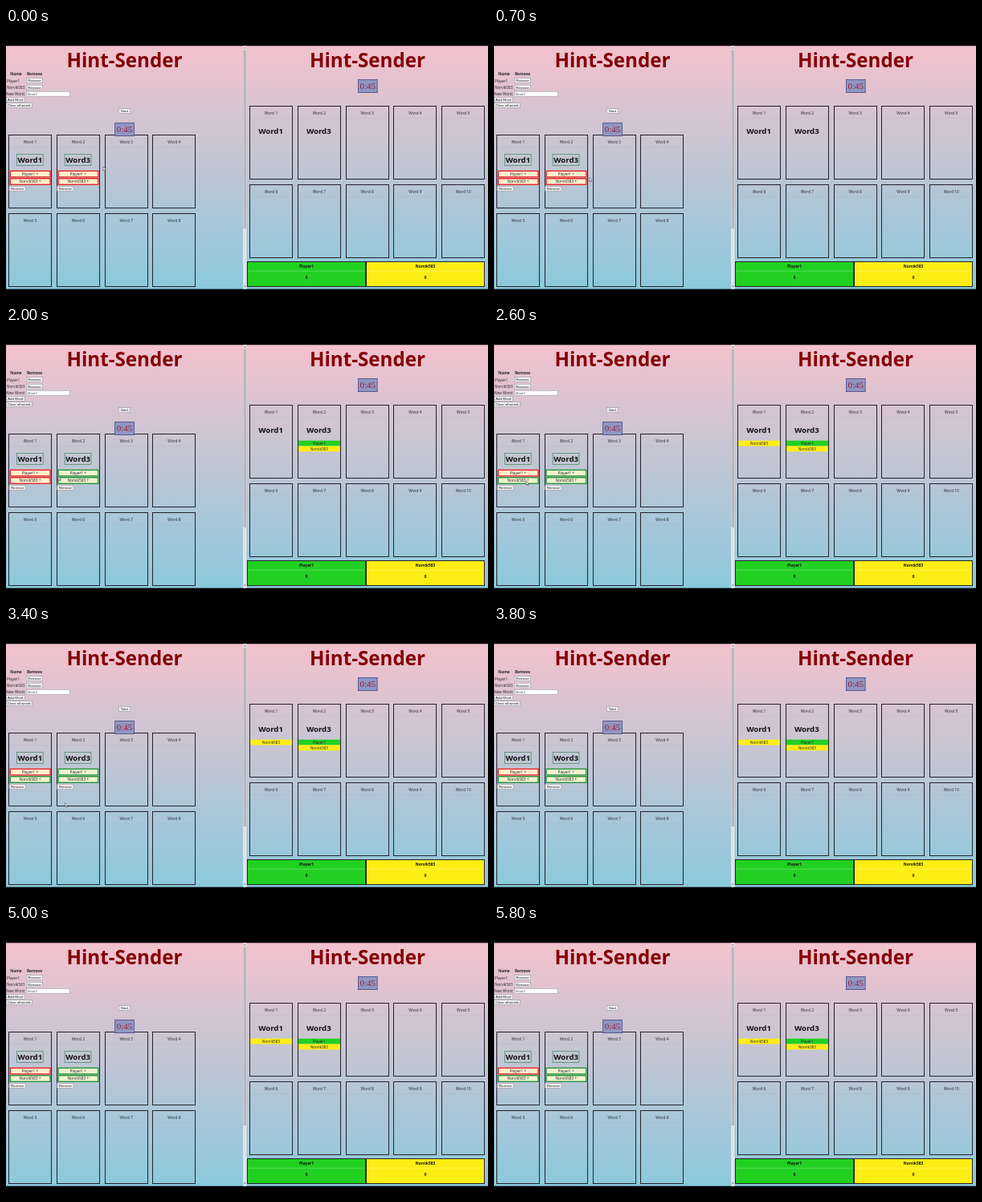
An HTML page with a canvas that plays this animation: 600x338 px, repeating every 5.9 s.

```html
<!DOCTYPE html>
<html lang="en">
<head>
<meta charset="utf-8">
<title>Word game</title>
<style>
html, body { margin: 0; width: 100%; height: 100%; overflow: hidden; background: #000; }
canvas { display: block; }
</style>
</head>
<body>
<canvas id="stage" width="600" height="338"></canvas>
<script>
const ctx = document.getElementById('stage').getContext('2d');
const LOOP = 5900;
const SANS = '"Open Sans", "Noto Sans", sans-serif';
const ARIAL = '"Liberation Sans", Arial, sans-serif';
const SERIF = '"Liberation Serif", Times, serif';
const TITLE = 'Hint-Sender';
const PLAYERS = ['Player1', 'Norvik583'];
const GREEN = '#22d022', YELLOW = '#fcee14', INK = '#25222b';
const STEP = 59.8;
const TOP = 22.3, BOTTOM = 325.6;

// Time at which each player is credited with each word
const CREDIT = [[Infinity, 2300], [1700, 1000]];
// Pointer path: time, x, y
const PATH = [
  [0, 121, 173], [700, 118.5, 186.5], [1000, 106, 190], [1400, 96.5, 178.5],
  [1700, 96, 180], [2250, 42, 191], [2600, 40, 192], [3400, 73.5, 220.5], [3800, 76, 226]
];

function rect(x, y, w, h, fill, stroke, line = 1) {
  if (fill) {
    ctx.fillStyle = fill;
    ctx.fillRect(x, y, w, h);
  }
  if (stroke) {
    ctx.strokeStyle = stroke;
    ctx.lineWidth = line;
    ctx.strokeRect(x + line / 2, y + line / 2, w - line, h - line);
  }
}

function text(s, x, y, size, { weight = '', family = SANS, color = INK, align = 'center' } = {}) {
  ctx.font = `${weight} ${size}px ${family}`;
  ctx.fillStyle = color;
  ctx.textAlign = align;
  ctx.fillText(s, x, y);
}

function button(label, x, y, w) {
  rect(x, y, w, 6.4, '#f2f0f2', '#85818a', 0.5);
  text(label, x + w / 2, y + 4.8, 4.4, { family: ARIAL });
}

function timer(x, y) {
  rect(x, y, 24.5, 17, '#9096c2', '#4b4d80', 0.8);
  text('0:45', x + 12.2, y + 12.4, 11, { family: SERIF, color: '#a01c38' });
}

function card(n, x, y) {
  rect(Math.round(x), y, 54, 92, null, INK);
  text('Word ' + n, x + 27, y + 11.2, 4.9);
  rect(x + 2, y + 15.6, 50, 0.6, 'rgba(110,110,125,.15)');
}

function title(x) {
  text(TITLE, x, 48.5, 24.2, { weight: 'bold', color: '#850006' });
}

function drawHost(t) {
  const left = { align: 'left' };
  title(147.5);
  text('Name', 12.5, 59.3, 4.8, { weight: 'bold' });
  text('Remove', 35.5, 59.3, 4.8, { weight: 'bold' });
  PLAYERS.forEach((name, i) => {
    text(name, 1, 67.6 + i * 8.5, 4.7, left);
    button('Remove', 25, 62.4 + i * 8.5, 21);
  });
  text('New Word:', 0, 84.2, 4.7, left);
  rect(25, 79, 54.5, 6.4, '#fff', '#85818a', 0.5);
  text('Word3', 26.5, 83.8, 4.2, { family: ARIAL, align: 'left', color: '#555' });
  button('Add Word', 0, 86.2, 23.5);
  button('Clear all words', 0, 93.4, 32.5);
  button('Start', 140, 100.4, 15);

  for (let i = 0; i < 8; i++) card(i + 1, 3 + (i % 4) * STEP, i < 4 ? 133 : 231);
  timer(135.3, 118);

  ['Word1', 'Word3'].forEach((word, i) => {
    const x = 3 + i * STEP;
    rect(x + 10, 157, 33.5, 14.8, null, '#3f8a5c', 0.7);
    text(word, x + 26.8, 168, 9.6, { weight: 'bold', color: '#111' });
    PLAYERS.forEach((name, p) => {
      const on = t >= CREDIT[i][p], y = 177.7 + p * 9.4;
      rect(x + 1.7, y, 51, 8.8, on ? '#f2f3cf' : '#fff0cc', on ? '#178b32' : '#e21622', 1.3);
      text(name + ' +', x + 27, y + 6.2, 4.8);
    });
    button('Remove', x + 0.8, 197.2, 20.5);
  });
}

function drawBoard(t) {
  title(450);
  timer(438, 64);
  for (let i = 0; i < 10; i++) card(i + 1, 303 + (i % 5) * STEP, i < 5 ? 97 : 195);

  ['Word1', 'Word3'].forEach((word, i) => {
    const x = 303 + i * STEP;
    let y = 141.7;
    text(word, x + 26.5, 132, 9.6, { weight: 'bold', color: '#111' });
    PLAYERS.forEach((name, p) => {
      if (t < CREDIT[i][p]) return;
      rect(x + 1.3, y, 51.8, 6.8, p ? YELLOW : GREEN);
      text(name, x + 27, y + 5.2, 4.7);
      y += 6.8;
    });
  });

  PLAYERS.forEach((name, p) => {
    const x = 300 + p * 148, mid = x + 74;
    rect(x, 291, 148, 32, p ? YELLOW : GREEN, INK);
    rect(x + 1, 302.8, 146, 0.6, 'rgba(255,255,255,.4)');
    text(name, mid, 299.2, 4.8, { weight: 'bold', color: '#111' });
    text('0', mid, 312.7, 4.8, { weight: 'bold', color: '#111' });
  });
}

function drawScrollbar() {
  rect(295, TOP, 4.5, BOTTOM - TOP, '#e4e2e6');
  rect(295.5, 27.5, 3.5, 222.5, '#b9b7bd');
  [[24, 1.4], [323, -1.4]].forEach(([y, d]) => {
    ctx.fillStyle = '#626066';
    ctx.beginPath();
    ctx.moveTo(297.2, y);
    ctx.lineTo(298.5, y + d);
    ctx.lineTo(295.9, y + d);
    ctx.fill();
  });
}

function drawPointer(t) {
  const k = PATH.findIndex(p => p[0] > t);
  if (k < 1) return;
  const [t0, x0, y0] = PATH[k - 1], [t1, x1, y1] = PATH[k];
  const u = (t - t0) / (t1 - t0), e = u * u * (3 - 2 * u);
  ctx.save();
  ctx.translate(x0 + (x1 - x0) * e, y0 + (y1 - y0) * e);
  ctx.beginPath();
  [[0, 0], [0, 5], [1.2, 4], [2, 5.8], [2.8, 5.4], [2, 3.7], [3.6, 3.6]]
    .forEach(p => ctx.lineTo(...p));
  ctx.closePath();
  ctx.fillStyle = '#fff';
  ctx.fill();
  ctx.strokeStyle = '#222';
  ctx.lineWidth = 0.5;
  ctx.stroke();
  ctx.restore();
}

const sky = ctx.createLinearGradient(0, TOP, 0, BOTTOM);
sky.addColorStop(0, '#f3c2cd');
sky.addColorStop(1, '#8bc9dc');

function frame(now) {
  const t = now % LOOP;
  rect(0, 0, 600, 338, '#000');
  rect(0, TOP, 600, BOTTOM - TOP, sky);
  drawHost(t);
  drawBoard(t);
  drawScrollbar();
  drawPointer(t);
  requestAnimationFrame(frame);
}
requestAnimationFrame(frame);
</script>
</body>
</html>
```
